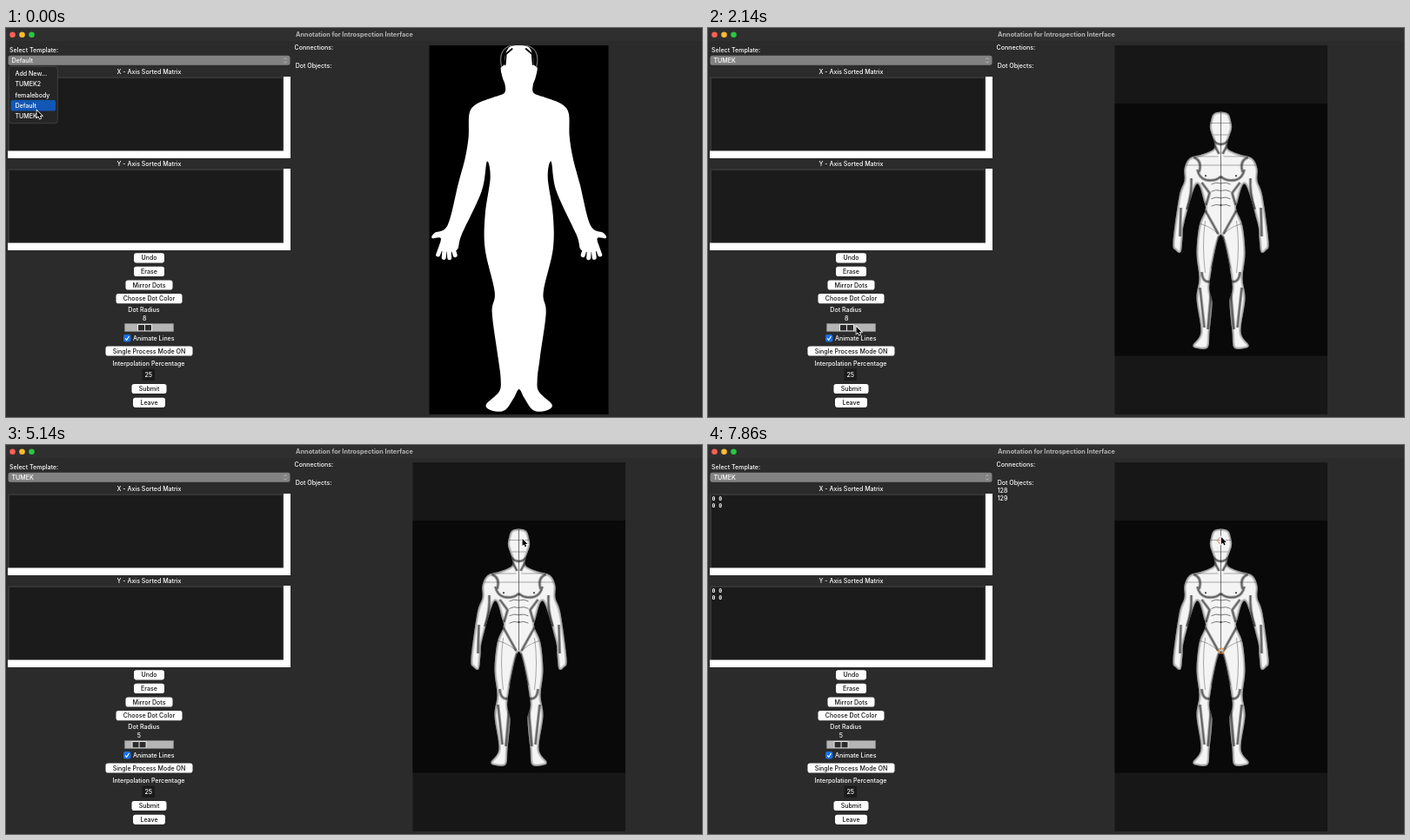
An HTML page with a canvas for the animation above (8000 ms loop, 800 px wide and 448 px high).

```html
<!DOCTYPE html>
<html lang="en">
<head>
<meta charset="utf-8">
<title>Annotation for Introspection Interface</title>
<style>
html, body { margin: 0; width: 100%; height: 100%; overflow: hidden; background: #2b2b2b; }
canvas { display: block; width: 800px; height: 448px; }
</style>
</head>
<body>
<canvas id="stage"></canvas>
<script>
const LOOP = 8000, STEP = 1000 / 7;
const canvas = document.getElementById('stage');
const dpr = window.devicePixelRatio || 1;
canvas.width = 800 * dpr;
canvas.height = 448 * dpr;
const c = canvas.getContext('2d');
c.scale(dpr, dpr);

const FAMILY = 'Inter, "Open Sans", sans-serif';
const UI = '500 7.05px ' + FAMILY;
const MONO = 'bold 6.5px "DejaVu Sans Mono", monospace';
const MENU = ['Add New...', 'TUMEK2', 'femalebody', 'Default', 'TUMEK'];
const PLAIN_X = 589.7, MUSCLE_X = 589.5;

// Rests of the pointer tip: from, until, x, y. It eases from one to the next.
const RESTS = [
  [0, 0, 35.5, 95], [290, 710, 35, 100.5], [1290, 1570, 358, 111],
  [2140, 2140, 170.5, 344], [2430, 3000, 161, 347], [3570, 3860, 152, 346.5],
  [4710, 4710, 674, 112], [5000, 5000, 597, 108], [5290, 5710, 590, 108],
  [6860, 7000, 592, 236], [7860, LOOP, 590, 106]
];

// Left half outlines: distance from the centre line and y.
const PLAIN = [[0, 20], [11, 22], [16, 32], [17, 42], [21, 46], [19, 57], [16, 66], [17, 75],
  [30, 80], [48, 87], [57, 98], [58, 125], [62, 150], [70, 180], [82, 227], [97, 236],
  [100, 242], [90, 242], [91, 256], [72, 256], [66, 238], [43, 188], [37, 154], [33, 172],
  [39, 215], [39, 255], [28, 304], [31, 328], [24, 380], [21, 405], [23, 419], [38, 434],
  [30, 441], [16, 440], [6, 426], [0, 416]];
const MUSCLE = [[0, 96.5], [8.5, 99], [11.5, 107], [12.5, 116], [8, 130], [8, 139], [20, 145],
  [36, 150], [42, 162], [42, 176], [48, 194], [55, 246], [52, 256], [46, 258], [44, 242],
  [42, 224], [28, 180], [19, 201], [18, 210], [25, 228], [28, 260], [25, 288], [28, 312],
  [23, 350], [32, 365], [27, 369], [15, 368], [13, 350], [10, 316], [13, 294], [0, 238]];

// Smooth closed curve through the points, mirrored around cx.
function outline(half, cx) {
  const left = half.map(([d, y]) => [cx - d, y]);
  const right = half.slice(1, -1).reverse().map(([d, y]) => [cx + d, y]);
  const pts = [...left, ...right], n = pts.length, at = i => pts[(i + n) % n];
  const path = new Path2D();
  path.moveTo(...pts[0]);
  for (let i = 0; i < n; i++) {
    const [a, b, d, e] = [at(i - 1), at(i), at(i + 1), at(i + 2)];
    path.bezierCurveTo(b[0] + (d[0] - a[0]) / 6, b[1] + (d[1] - a[1]) / 6,
      d[0] - (e[0] - b[0]) / 6, d[1] - (e[1] - b[1]) / 6, d[0], d[1]);
  }
  path.closePath();
  return path;
}

const plainBody = outline(PLAIN, PLAIN_X);
const muscleBody = outline(MUSCLE, MUSCLE_X);

// Half drawings around x = 0: thin guides and shaded folds.
const GUIDES = new Path2D('M0 97V236 M0 109.5H12 M0 123H8 M0 158H40 M3 148H28 M25 225Q8 230 2 239 M18 222Q22 250 18 282');
const FOLDS = new Path2D('M9 129Q5 134 0 134 M8 134L2 145 M0 171Q6 177 17 175Q25 173 27 163' +
  'M31 149Q21 153 25 166 M22 178L13 190L17 204 M18 210L3 237 M2 240L10 277' +
  'M22 281Q21 294 12 292 M34 173Q33 190 39 209 M46 207L47 240 M24 299L19 345 M11 300L15 347');

function mirrored(cx, paint) {
  for (const side of [-1, 1]) {
    c.save();
    c.translate(cx, 0);
    c.scale(side, 1);
    paint();
    c.restore();
  }
}

function rect(x, y, w, h, color, r = 0, border) {
  c.beginPath();
  c.roundRect(x, y, w, h, r);
  c.fillStyle = color;
  c.fill();
  if (border) { c.strokeStyle = border; c.lineWidth = 0.6; c.stroke(); }
}

function text(s, x, y, color = '#fff', align = 'left', font = UI) {
  c.font = font;
  c.textAlign = align;
  c.fillStyle = color;
  c.fillText(s, x, y + 2.6);
}

function circle(x, y, r) {
  c.beginPath();
  c.arc(x, y, r, 0, 7);
}

function disc(x, y, r, color) {
  circle(x, y, r);
  c.fillStyle = color;
  c.fill();
}

function stroke(color, width, path) {
  c.strokeStyle = color;
  c.lineWidth = width;
  if (path) c.stroke(path); else c.stroke();
}

function line(points, color, width) {
  c.beginPath();
  for (const [x, y] of points) c.lineTo(x, y);
  stroke(color, width);
}

function button(label, y, w) {
  rect(164.5 - w / 2, y - 5.6, w, 11.2, '#fff', 2.8);
  text(label, 164.5, y, '#111', 'center');
}

function matrix(title, top, rows) {
  text(title, 164.5, top - 5.3, '#fff', 'center');
  rect(2, top, 317, 86, '#353535');
  rect(4, top + 2, 313.5, 83.5, '#1b1b1b');
  rect(319, top, 8, 94, '#fff');
  rect(2, top + 85.5, 325, 8.5, '#fff');
  for (let i = 0; i < rows; i++)
    text(Array(rows).fill('0').join(' '), 4.5, top + 5.5 + i * 8, '#fff', 'left', MONO);
}

function slider(value) {
  const x = 152 - (8 - value) * 2.15;
  text(value, x + 7.3, 334.8, '#fff', 'center');
  rect(136.5, 340.5, 56, 9, '#b5b5b5', 0, '#8a8a8a');
  rect(x - 1, 341, 17, 8, '#e6e6e6');
  for (const side of [0, 8]) rect(x + side, 342, 7, 6.4, '#2b2b2b');
}

function controls(value) {
  ['Undo', 'Erase', 'Mirror Dots', 'Choose Dot Color'].forEach((label, i) =>
    button(label, 264.8 + i * 15.6, [35, 35, 54, 76][i]));
  text('Dot Radius', 158.5, 324.5, '#fff', 'center');
  slider(value);
  rect(135, 353, 8.4, 8.4, '#1a70e6', 2);
  line([[137, 357.4], [138.7, 359.4], [141.5, 355]], '#fff', 1.1);
  text('Animate Lines', 146, 357.3);
  button('Single Process Mode ON', 372, 100);
  text('Interpolation Percentage', 164, 386, '#fff', 'center');
  rect(156.5, 392.5, 14.5, 13.5, '#1b1b1b');
  text('25', 163.7, 399.2, '#fff', 'center');
  button('Submit', 415.5, 40);
  button('Leave', 431.3, 37);
}

function plainFigure() {
  rect(486.5, 20, 206, 425, '#000');
  c.save();
  c.beginPath();
  c.rect(486.5, 20, 206, 425);
  c.clip();
  c.fillStyle = '#fff';
  c.fill(plainBody);
  c.lineCap = 'round';
  mirrored(PLAIN_X, () => {
    for (let i = 0; i < 4; i++)
      line([[89 - i * 4, 250], [93 - i * 6.5, 261 + 4 * Math.sin(i)]], '#fff', 5);
    stroke('#777', 1.2, new Path2D('M20 45Q25 24 8 20'));
    stroke('#000', 1.8, new Path2D('M16 42L15 30L8 24'));
  });
  c.restore();
}

function muscleFigure() {
  rect(467.5, 20, 244.5, 425, '#171717');
  rect(467.5, 87, 244.5, 290.5, '#090909');
  c.save();
  c.clip(muscleBody);
  rect(525, 90, 130, 290, '#f4f4f4');
  for (const w of [1.6, 3, 5]) stroke('rgba(0,0,0,0.16)', w, muscleBody);
  mirrored(MUSCLE_X, () => {
    stroke('rgba(25,25,25,0.6)', 0.6, GUIDES);
    for (const w of [0.8, 2, 3.6]) stroke('rgba(0,0,0,0.3)', w, FOLDS);
    for (let y = 179; y < 206; y += 8.4)
      stroke('rgba(20,20,20,0.7)', 0.8, new Path2D(`M0 ${y}Q6 ${y - 2} 11 ${y + 1}`));
    disc(17.5, 170.3, 1, '#222');
  });
  disc(MUSCLE_X, 204, 1, '#222');
  c.restore();
}

function menu(active) {
  rect(3.3, 44.3, 56, 65.4, '#252525', 3, '#555');
  if (active >= 0) rect(5.5, 83 + (active - 3) * 12.3, 51.5, 12.6, '#1257b5', 2);
  MENU.forEach((s, i) => text(s, 10.5, 52.5 + i * 12.25));
}

function pointerAt(t) {
  const i = RESTS.findLastIndex(r => r[0] <= t);
  const [, leave, x, y] = RESTS[i];
  if (t <= leave) return [x, y];
  const [arrive, , nx, ny] = RESTS[i + 1];
  const p = (t - leave) / (arrive - leave), e = p * p * (3 - 2 * p);
  return [x + (nx - x) * e, y + (ny - y) * e];
}

function pointer(x, y) {
  c.save();
  c.translate(x, y);
  const arrow = new Path2D('M0 0V8L1.9 6.4L3.2 9.4L4.6 8.8L3.4 5.9H5.9Z');
  stroke('#fff', 1.5, arrow);
  c.fillStyle = '#000';
  c.fill(arrow);
  c.restore();
}

function draw(t) {
  const dots = t < 5570 ? 0 : t < 7000 ? 1 : 2;
  const radius = 8 - Math.max(0, Math.min(3, Math.floor((t - 3000) / 140)));
  const chosen = t >= 710;

  rect(0, 0, 800, 448, '#2b2b2b');
  rect(0, 0, 800, 15, '#2f2f2f');
  ['#fe5f57', '#febc2e', '#28c840'].forEach((color, i) => disc(7.5 + i * 11, 7.8, 3.3, color));
  text('Annotation for Introspection Interface', 400.5, 7.3, '#b5b5b5', 'center',
    'bold 7.3px ' + FAMILY);

  text('Select Template:', 4, 25.3);
  rect(2.5, 31.7, 324, 11, '#828282', 2.5);
  text(chosen ? MENU[4] : MENU[3], 6.5, 37.4);
  for (const s of [-1, 1])
    line([[319.3, 37.3 + s * 1.1], [321, 37.3 + s * 3], [322.7, 37.3 + s * 1.1]], '#ccc', 0.7);

  matrix('X - Axis Sorted Matrix', 56, dots);
  matrix('Y - Axis Sorted Matrix', 162, dots);
  controls(radius);

  text('Connections:', 331.5, 22.5);
  text('Dot Objects:', 332.7, 43.8);
  for (let i = 0; i < dots; i++) text(128 + i, 332.7, 52.7 + i * 8.8);

  if (chosen) muscleFigure(); else plainFigure();
  if (dots > 0) {
    circle(589, 110, 3.3);
    stroke('#dc9270', 1);
    line([[584, 110], [594, 110]], '#d9a08c', 0.6);
  }
  if (dots > 1) {
    circle(590, 237, 3);
    stroke('#e08a2c', 1.2);
  }

  if (t < 570) menu(t < 140 ? 3 : t < 420 ? 4 : -1);
  pointer(...pointerAt(t));
}

function frame() {
  const t = performance.now() % LOOP;
  draw(Math.ceil(Math.floor((t + 6) / STEP) * STEP));
  requestAnimationFrame(frame);
}
frame();
</script>
</body>
</html>
```
